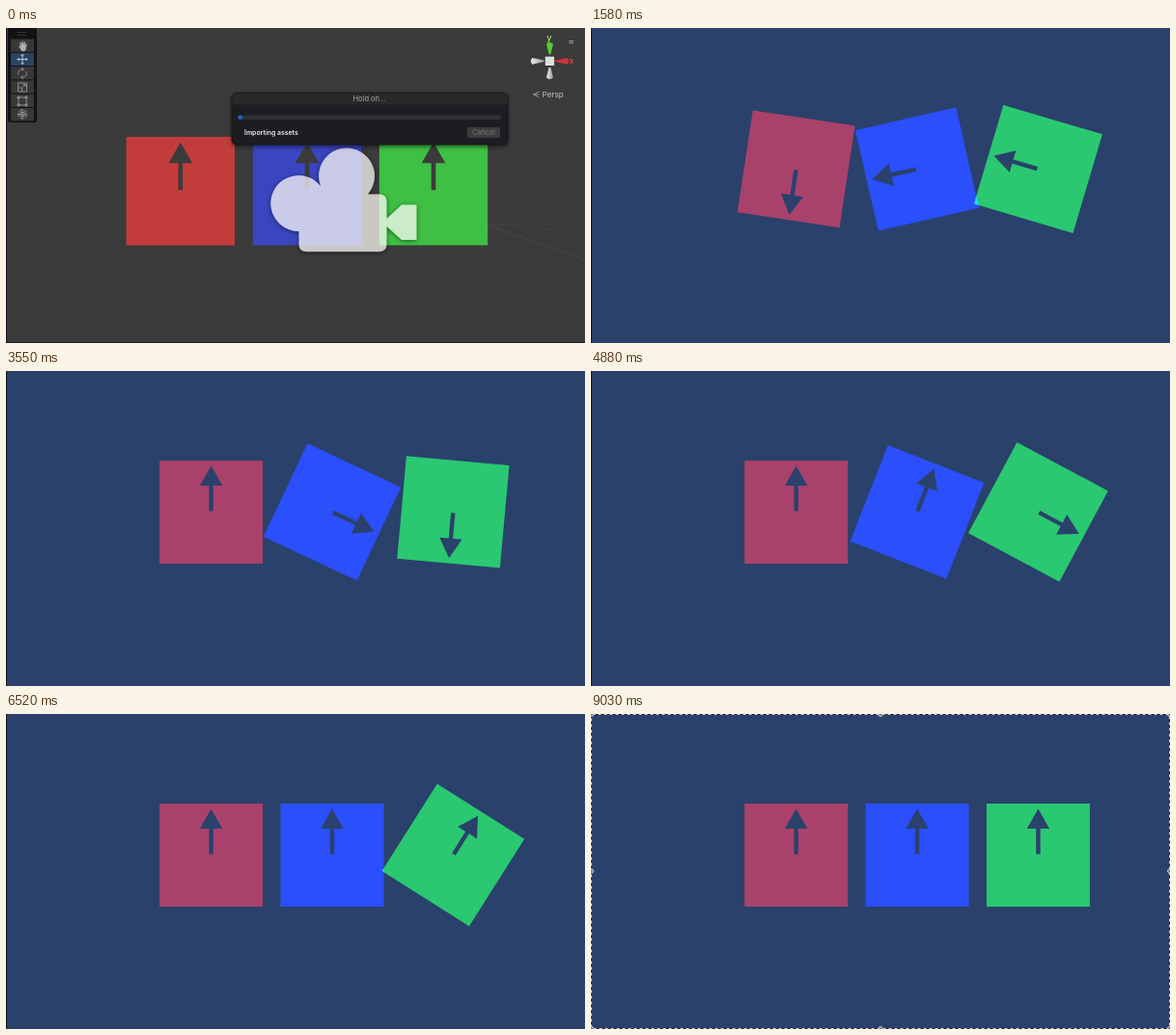
Write an HTML page that moves like this. It is 600 px wide and 327 px high and loops after 9180 ms.

```html
<!DOCTYPE html>
<html lang="en">
<head>
<meta charset="utf-8">
<title>Rotating squares</title>
<style>
  html, body { margin: 0; width: 100%; height: 100%; overflow: hidden; background: #2a416b; }
  svg { display: block; width: 100%; height: 100%; }
  text { font-family: Inter, "Open Sans", sans-serif; }
  #play { isolation: isolate; }
  .tile { mix-blend-mode: plus-lighter; }
  .icon { fill: none; stroke: #969696; stroke-width: .9; }
</style>
</head>
<body>
<svg viewBox="0 0 600 327" xmlns="http://www.w3.org/2000/svg">
  <defs>
    <!-- unit square of 107 px with an arrow cut out of it -->
    <path id="tile" fill-rule="evenodd" d="M-53.5-53.5h107v107h-107zM0-48L11.7-27.5H2.2V-1H-2.2V-27.5H-11.7z"/>
    <linearGradient id="cone"><stop stop-color="#eee"/><stop offset="1" stop-color="#999"/></linearGradient>
    <filter id="soft" x="-20%" y="-20%" width="140%" height="150%"><feGaussianBlur stdDeviation="2.5"/></filter>
    <path id="camera" d="M303.500 211A29 29 0 1 1 326 164A29 29 0 1 1 375 172.500H386.500Q394.500 172.500 394.500 180.500V198L410 183.500H425.500V220H410L394.500 206V224.500Q394.500 232.300 386.500 232.300H311.500Q303.500 232.300 303.500 224.500z"/>
    <!-- keeps the shadow from darkening the translucent camera -->
    <mask id="outside" maskUnits="userSpaceOnUse" x="250" y="100" width="200" height="160">
      <rect x="250" y="100" width="200" height="160" fill="#fff"/>
      <use href="#camera" fill="#000"/>
    </mask>
    <circle id="handle" r="2" fill="#777" stroke="#ddd" stroke-width=".9"/>
  </defs>

  <g id="editor">
    <rect width="600" height="327" fill="#3b3b3b"/>
    <path d="M0 203.500H600M499 203L600 213" fill="none" stroke="#434343" stroke-width=".6"/>
    <path d="M499 204.500L600 240.500" stroke="#4a4a4a" stroke-width=".8"/>
    <g id="sceneTiles"></g>
    <g mask="url(#outside)">
      <use href="#camera" fill="#000" opacity=".5" transform="translate(0 1)" filter="url(#soft)"/>
    </g>
    <use href="#camera" fill="#fffdf8" opacity=".73"/>

    <g id="toolbar">
      <rect x="2" y="0" width="30" height="98" rx="2" fill="#121214"/>
      <path d="M12 4.500H22M12 7.500H22" stroke="#484848" stroke-dasharray="1.500 1"/>
      <g id="buttons"></g>
      <path d="M13.500 19L15 21.500Q16 24 18 24Q20.500 24 20.500 21L21.500 16.500L19.800 18.500L19.500 14L18 17.500L17 13.500L16 18L14.500 15L15.200 20z" fill="#b0b0b0" stroke="#b0b0b0" stroke-width=".6"/>
      <path class="icon" style="stroke:#c8d2dc" d="M17 27.500V37.500M12 32.500H22M15.500 29L17 27.500L18.500 29M15.500 36L17 37.500L18.500 36M13.500 31L12 32.500L13.500 34M20.500 31L22 32.500L20.500 34"/>
      <path class="icon" d="M13 49A4.500 4.500 0 0 1 18 42.700M21 45A4.500 4.500 0 0 1 16 51.300M16.500 41L18.500 42.700L16.500 44.500M17.500 49.500L15.500 51.300L17.500 53"/>
      <path class="icon" d="M12.500 57H21.500V66H12.500zM12.500 62H16.500V66M17 61.500L20 58.500M17.500 58.500H20V61"/>
      <path class="icon" d="M13 72H21V80H13zM12 71h2v2h-2zM20 71h2v2h-2zM12 79h2v2h-2zM20 79h2v2h-2z"/>
      <path class="icon" d="M17 84.500V94.500M12 89.500H22M15 87.500h4v4h-4z"/>
      <circle class="icon" cx="17" cy="89.500" r="4.500" stroke-dasharray="4 1.500"/>
    </g>

    <g id="compass">
      <path d="M563.500 28V20M568 34.300H575" stroke="#c33"/>
      <path d="M560 16.500Q563.500 13 567 16.500L564.500 27H562.500z" fill="#4fce38"/>
      <path d="M581.500 31Q585 34.300 581.500 37.700L570 35V33.500z" fill="#cf3333"/>
      <path d="M545.500 31Q542 34.300 545.500 37.700L557.500 35V33.500z" fill="url(#cone)"/>
      <path d="M560 51.500Q563.500 55 567 51.500L564.500 41H562.500z" fill="url(#cone)"/>
      <rect x="558.800" y="29.700" width="9.300" height="9.300" fill="#dce2de"/>
      <text x="563" y="13" font-size="9" font-weight="600" text-anchor="middle" fill="#82e05a">y</text>
      <text x="586" y="37" font-size="8.500" font-weight="600" text-anchor="middle" fill="#e04a42">x</text>
      <path d="M583.500 13.500H588M583.500 15.500H588" stroke="#aaa" stroke-width=".9"/>
      <path d="M552.500 66L546.500 69L552.500 72M546.500 69H552.500" fill="none" stroke="#aaa" stroke-width=".8"/>
      <text x="555.500" y="72" font-size="8.200" fill="#c4c4c4">Persp</text>
    </g>

    <g id="dialog">
      <rect x="234" y="69" width="286" height="54" rx="5" fill="#000" opacity=".6" filter="url(#soft)"/>
      <rect x="234" y="67.500" width="286" height="53.500" rx="5" fill="#1c1d20" stroke="#151517" stroke-width=".8"/>
      <path d="M234.500 79.500V72Q234.500 68 239 68H515Q519.500 68 519.500 72V79.500z" fill="#29292b"/>
      <text x="376.500" y="76" font-size="7.500" text-anchor="middle" fill="#a8a8a8">Hold on...</text>
      <rect x="240" y="90.500" width="273" height="4.500" rx="2" fill="#2f3033"/>
      <rect x="240.500" y="90.500" width="4.500" height="4.500" rx="2.200" fill="#1b62d6"/>
      <text x="247" y="111" font-size="6.900" font-weight="600" fill="#ececec">Importing assets</text>
      <rect x="478" y="103" width="34" height="11" rx="2" fill="#3c3c3e"/>
      <text x="495" y="111" font-size="7.400" text-anchor="middle" fill="#78787a">Cancel</text>
    </g>
    <path d="M0 326.500H600" stroke="#1e1e1e"/>
  </g>

  <g id="play">
    <rect width="600" height="327" fill="#2a416b"/>
  </g>
  <path d="M.5 0V327" stroke="#0c0f16"/>

  <g id="frame">
    <path d="M.5 .5H599.500V326.500H.5z" fill="none" stroke="#15181f"/>
    <path id="ants" d="M.5 .5H599.500V326.500H.5z" fill="none" stroke="#c8ccd2" stroke-dasharray="3 3"/>
  </g>
</svg>

<script>
const LOOP = 9180;
const STEP = 940 / 31;
const PLAY = 30, SPIN = 148;    // game view opens, rotation starts
const ANTS = 7820, ANTS_STOP = 8360, ANTS_NUDGE = 9030;

// additive fills for the game view, plain fills for the editor
const tiles = [
  { x: 212.6, sceneX: 180.8, add: '#7e0100', fill: '#c33c3c', turn: 3000 },
  { x: 338, sceneX: 312, add: '#000e90', fill: '#3a46c0', turn: 5000 },
  { x: 463.4, sceneX: 443, add: '#008706', fill: '#3ec044', turn: 7000 }
];

const $ = id => document.getElementById(id);

function add(parent, tag, attrs) {
  const el = document.createElementNS('http://www.w3.org/2000/svg', tag);
  for (const key in attrs) el.setAttribute(key, attrs[key]);
  return parent.appendChild(el);
}

for (const tile of tiles) {
  add($('sceneTiles'), 'use', {
    href: '#tile', fill: tile.fill,
    transform: `translate(${tile.sceneX} 169.2) scale(1.05)`
  });
  tile.el = add($('play'), 'use', { href: '#tile', fill: tile.add, class: 'tile' });
}

for (let i = 0; i < 6; i++) {
  add($('buttons'), 'rect', {
    x: 5, y: 11.5 + i * 14.3, width: 24, height: 13.3,
    fill: i === 1 ? '#2a4560' : '#383838'
  });
}

for (const x of [0.5, 300, 599.5])
  for (const y of [0.5, 163, 326.5])
    if (x !== 300 || y !== 163) add($('frame'), 'use', { href: '#handle', x, y });

const show = (id, on) => $(id).setAttribute('display', on ? 'inline' : 'none');

function draw(t) {
  show('editor', t < PLAY);
  show('play', t >= PLAY);
  show('frame', t >= ANTS);

  const snapped = PLAY + Math.floor((t - PLAY) / STEP + 0.01) * STEP;
  for (const { el, x, turn } of tiles) {
    const part = Math.min(1, Math.max(0, (snapped - SPIN) / turn));
    el.setAttribute('transform', `translate(${x} 146.4) rotate(${-360 * part})`);
  }

  const march = Math.floor((Math.min(t, ANTS_STOP) - ANTS) / 30) + (t >= ANTS_NUDGE ? 1 : 0);
  $('ants').setAttribute('stroke-dashoffset', -march);
}

const start = performance.now();
function tick() {
  draw((performance.now() - start) % LOOP);
  requestAnimationFrame(tick);
}
draw(0);
requestAnimationFrame(tick);
</script>
</body>
</html>
```
